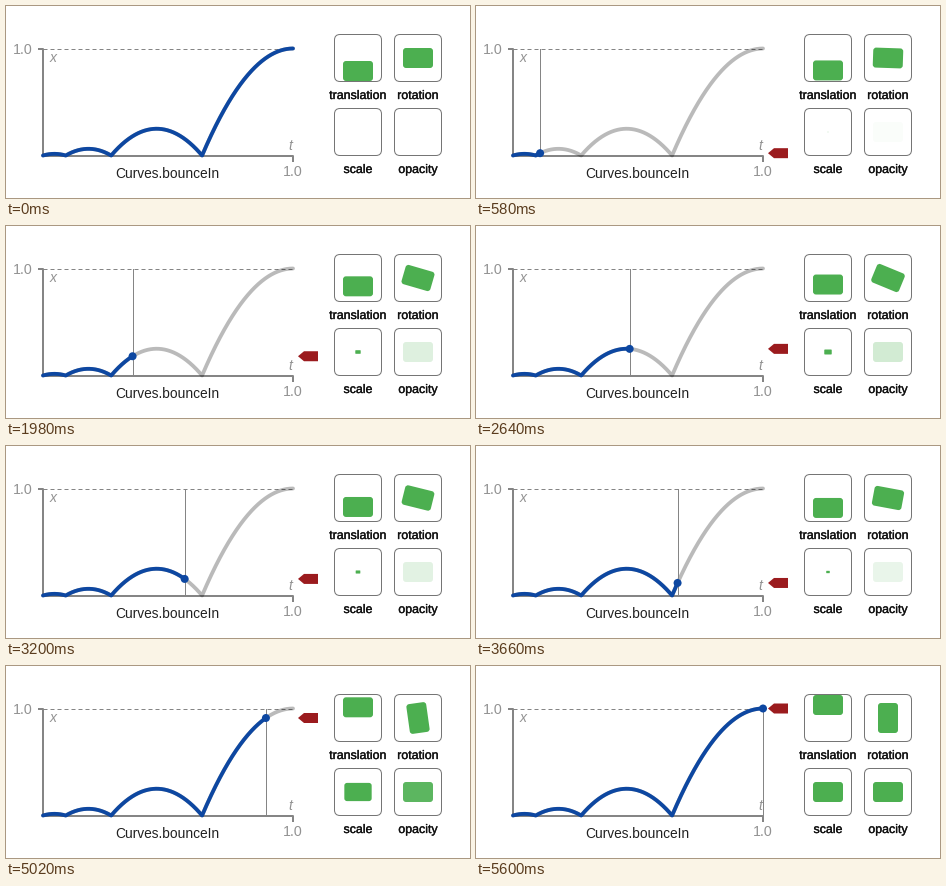
Animation of 464x192 px, one loop 5.62 s. Source, as a matplotlib script:

```python
import matplotlib.pyplot as plt
import matplotlib.patheffects as pe
import numpy as np
from matplotlib.animation import FuncAnimation
from matplotlib.patches import Circle, FancyBboxPatch, Polygon
from matplotlib.transforms import Affine2D

W, H, DPI = 464, 192, 64
PX = 72 / DPI  # points per pixel
LEFT, RIGHT, TOP, BASE = 37, 287, 42.5, 149.5
BLUE, GREEN, RED = "#0d47a1", "#4caf50", "#9b1b1e"
AXIS, FAINT = "#858585", "#929292"
STEPS = 120

plt.rcParams["font.family"] = "Liberation Sans"
fig = plt.figure(figsize=(W / DPI, H / DPI), dpi=DPI, facecolor="white")
ax = fig.add_axes([0, 0, 1, 1])
ax.set_xlim(0, W)
ax.set_ylim(H, 0)
ax.axis("off")


def bounce(t):
    if t < 1 / 2.75:
        return 7.5625 * t * t
    if t < 2 / 2.75:
        return 7.5625 * (t - 1.5 / 2.75) ** 2 + 0.75
    if t < 2.5 / 2.75:
        return 7.5625 * (t - 2.25 / 2.75) ** 2 + 0.9375
    return 7.5625 * (t - 2.625 / 2.75) ** 2 + 0.984375


def bounce_in(t):
    return 1 - bounce(1 - t)


def to_x(t):
    return LEFT + (RIGHT - LEFT) * t


def to_y(v):
    return BASE + (TOP - BASE) * v


def line(xs, ys, color, width, **kw):
    return ax.plot(xs, ys, color=color, lw=width * PX, **kw)[0]


def label(x, y, text, size, color, weight=0, **kw):
    item = ax.text(x, y, text, size=size * PX, color=color,
                   ha="center", va="baseline", zorder=3, **kw)
    if weight:
        item.set_path_effects([pe.withStroke(linewidth=weight * PX, foreground=color)])


def rounded(w, h, r, **kw):
    box = FancyBboxPatch((-w / 2, -h / 2), w, h,
                         boxstyle=f"round,pad=0,rounding_size={r}", **kw)
    return ax.add_patch(box)


def place(patch, x, y, angle=0, scale=1):
    move = Affine2D().scale(scale).rotate_deg(angle).translate(x, y)
    patch.set_transform(move + ax.transData)


# Chart
line([LEFT, RIGHT], [TOP, TOP], AXIS, 1, dashes=(4, 3), zorder=1)
line([LEFT - 4, LEFT, LEFT], [TOP, TOP, BASE + 0.5], AXIS, 2, zorder=1)
line([LEFT, RIGHT, RIGHT], [BASE + 0.5, BASE + 0.5, BASE + 5], AXIS, 2, zorder=1)
label(17, 48, "1.0", 14.2, FAINT)
label(287, 170, "1.0", 14.2, FAINT)
label(47, 56, "x", 14, FAINT, style="italic")
label(284.3, 144, "t", 14, FAINT, style="italic")
label(161.5, 172, "Curves.bounceIn", 13.8, "#212121")

ts = np.linspace(0, 1, 881)
xs = to_x(ts)
ys = to_y(np.array([bounce_in(t) for t in ts]))
curve = dict(solid_capstyle="round", solid_joinstyle="round")
line(xs, ys, "black", 3.8, alpha=0.27, zorder=4, **curve)
guide = line([], [], AXIS, 1, zorder=5)
trail = line([], [], BLUE, 3.8, zorder=6, **curve)
dot = ax.add_patch(Circle((0, 0), 4, fc=BLUE, lw=0, zorder=7))
arrow = ax.add_patch(Polygon([(0, 0)], fc=RED, lw=0, zorder=7))

# Sample tiles
tiles = {}
for name, x, y in [("translation", 352, 52), ("rotation", 412, 52),
                   ("scale", 352, 126), ("opacity", 412, 126)]:
    frame = rounded(47, 47, 5.5, fc="none", ec="#757575", lw=PX, zorder=3)
    place(frame, x, y)
    label(x, y + 41, name, 12.4, "#111111", 0.35)
    tiles[name] = rounded(30, 20, 3, fc=GREEN, lw=0, zorder=4)
    place(tiles[name], x, y)


def draw(slot):
    step = order[slot]
    t = step / STEPS
    v = bounce_in(t)
    x, y = to_x(t), to_y(v)
    running = step > 0
    for item in (guide, dot, arrow):
        item.set_visible(running)
    if running:
        done = ts < t
        trail.set_data(np.append(xs[done], x), np.append(ys[done], y))
    else:
        trail.set_data(xs, ys)
    guide.set_data([x, x], [TOP, BASE])
    dot.center = x, y
    arrow.set_xy([(292, y), (298, y - 5), (312, y - 5), (312, y + 5), (298, y + 5)])

    place(tiles["translation"], 352, 65 - 26 * v)
    place(tiles["rotation"], 412, 52, angle=90 * v)
    place(tiles["scale"], 352, 126, scale=max(v, 1e-3))
    tiles["scale"].set_visible(v > 0)
    tiles["opacity"].set_alpha(min(max(v, 0), 1))


# Every third step is held for five 20 ms slots
order = [i for i in range(STEPS + 1) for _ in range(5 if i % 3 == 1 else 1)]
anim = FuncAnimation(fig, draw, frames=len(order), interval=20,
                     init_func=lambda: draw(0), repeat=True, repeat_delay=0,
                     cache_frame_data=False)
plt.show()
```
